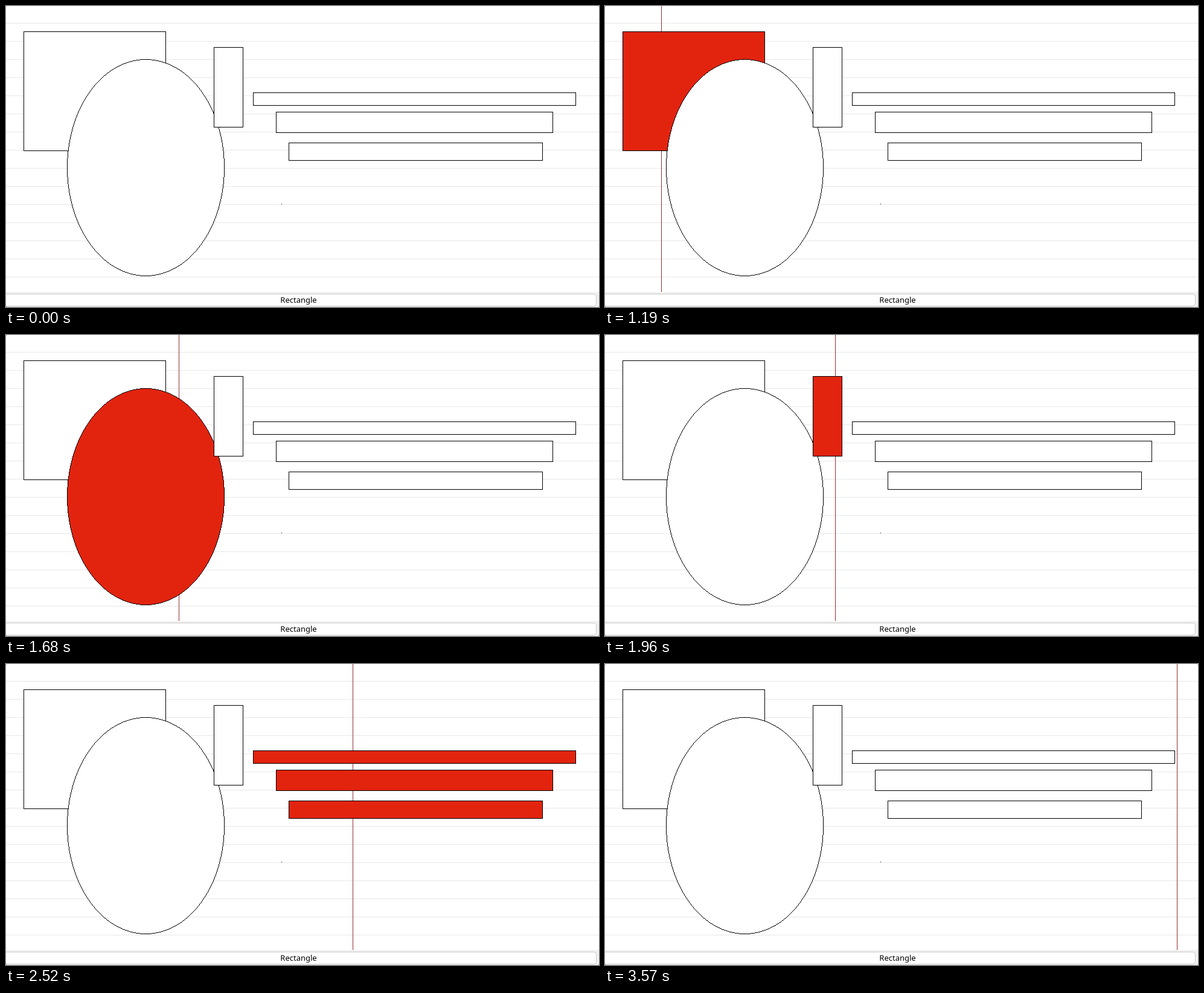
These frames come from a looping animation (982 by 498 pixels, 3640 ms). An HTML page with a canvas:

```html
<!DOCTYPE html>
<html lang="en">
<head>
<meta charset="utf-8">
<title>Sweep line</title>
<style>
html, body { margin: 0; width: 982px; height: 498px; overflow: hidden; background: #fff; }
canvas { display: block; }
</style>
</head>
<body>
<canvas id="stage" width="982" height="498"></canvas>
<script>
const ctx = document.getElementById('stage').getContext('2d');
const W = 982, H = 498, PANEL = 473;
const LOOP = 3640, STEP = 70, START = 910;
const RED = '#e2240f';

// Sweep position as [ms, x]
const path = [[910, 5], [1190, 93], [1680, 286], [1960, 381], [2520, 574], [3080, 768], [3570, 947]];

// Painted back to front; bounds are inclusive pixels
const shapes = [
  { l: 29, t: 42, r: 264, b: 239 },
  { l: 101, t: 88, r: 361, b: 446, round: true },
  { l: 344, t: 68, r: 392, b: 200 },
  { l: 409, t: 143, r: 943, b: 164 },
  { l: 447, t: 175, r: 905, b: 209 },
  { l: 468, t: 226, r: 888, b: 255 }
];

function box(color, x, y, w, h) {
  ctx.fillStyle = color;
  ctx.fillRect(x, y, w, h);
}

function sweepX(t) {
  if (t < START) return -1;
  for (let i = 1; i < path.length; i++) {
    const [t0, x0] = path[i - 1], [t1, x1] = path[i];
    if (t <= t1) return Math.round(x0 + (x1 - x0) * (t - t0) / (t1 - t0));
  }
  return path[path.length - 1][1];
}

// Ellipse with crisp, unsmoothed edges
function drawEllipse(s, fill) {
  const cx = (s.l + s.r) / 2, cy = (s.t + s.b) / 2;
  const rx = cx - s.l, ry = cy - s.t;
  const reach = (d, a, b) => Math.round(b * Math.sqrt(Math.max(0, 1 - d * d / (a * a))));
  for (let y = s.t; y <= s.b; y++) {
    const dx = reach(y - cy, ry, rx);
    box(fill, cx - dx, y, dx * 2 + 1, 1);
  }
  for (let y = s.t + 1; y < s.b; y++) {
    const dx = reach(y - cy, ry, rx);
    if (Math.abs(y - cy) / (ry * ry) > dx / (rx * rx)) continue;
    box('#000', cx - dx, y, 1, 1);
    box('#000', cx + dx, y, 1, 1);
  }
  for (let x = s.l; x <= s.r; x++) {
    const dy = reach(x - cx, rx, ry);
    if (dy / (ry * ry) < Math.abs(x - cx) / (rx * rx)) continue;
    box('#000', x, cy - dy, 1, 1);
    box('#000', x, cy + dy, 1, 1);
  }
}

function drawShape(s, hit) {
  const fill = hit ? RED : '#fff';
  if (s.round) return drawEllipse(s, fill);
  const w = s.r - s.l + 1, h = s.b - s.t + 1;
  box('#000', s.l, s.t, w, h);
  box(fill, s.l + 1, s.t + 1, w - 2, h - 2);
}

function drawButton() {
  box('#f2f2f2', 0, PANEL, W, H - PANEL);
  ctx.beginPath();
  ctx.roundRect(-10.5, 476.5, 988, 20, 4);
  ctx.fillStyle = '#fff';
  ctx.fill();
  ctx.strokeStyle = '#c6c6c6';
  ctx.lineWidth = 1;
  ctx.stroke();
  ctx.font = '500 13px "Noto Sans", "Open Sans", sans-serif';
  ctx.textAlign = 'center';
  ctx.fillStyle = '#000';
  ctx.fillText('Rectangle', 484.5, 491);
  for (const x of [0, W - 1]) {
    box('#999', x, 0, 1, 1);
    box('#999', x, H - 1, 1, 1);
  }
}

function draw(t) {
  const x = sweepX(t);
  box('#fff', 0, 0, W, H);
  for (let y = 28; y < PANEL; y += 30) box('#e8e8e8', 0, y, W, 1);
  if (x >= 0) box('#962e2e', x, 0, 1, PANEL);
  for (const s of shapes) drawShape(s, x >= s.l && x <= s.r);
  box('#000', 456, 327, 1, 1);
  drawButton();
}

const begin = performance.now();
function tick() {
  const t = (performance.now() - begin) % LOOP;
  draw(Math.floor(t / STEP) * STEP);
  requestAnimationFrame(tick);
}
tick();
</script>
</body>
</html>
```
